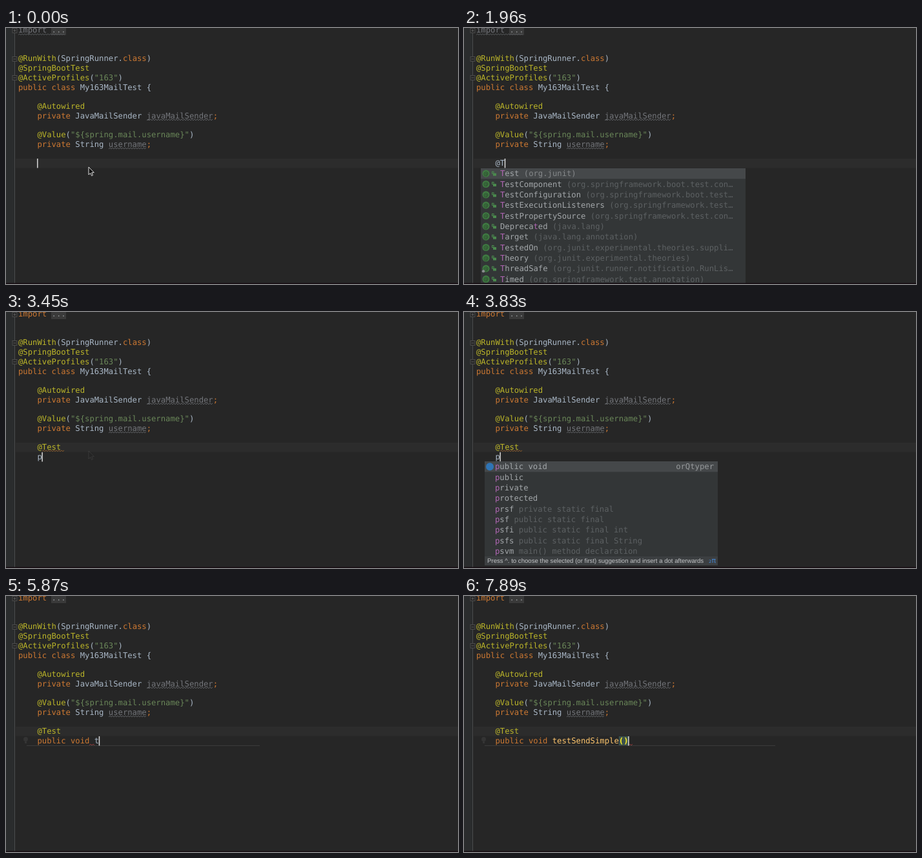
These frames come from a looping animation (700x396 px, 8000 ms). An HTML page with a canvas:

```html
<!DOCTYPE html>
<html lang="en">
<head>
<meta charset="utf-8">
<title>Code completion in an editor</title>
<style>
  html, body { margin: 0; width: 100%; height: 100%; overflow: hidden; background: #262626; }
  canvas { display: block; }
</style>
</head>
<body>
<canvas id="stage" width="700" height="396"></canvas>
<script>
const ctx = document.getElementById('stage').getContext('2d');
const LOOP = 8000, CHAR = 7.36, LINE = 14.72, ROW = 16.33, LEFT = 19;
const MONO = '12.23px "DejaVu Sans Mono", monospace';
const TEXT = '#a9b7c6', KEY = '#cc7832', NOTE = '#bbb529', STR = '#6a8759', DIM = '#73757a', RED = '#a03c3c';
const PLUGIN = 'orQtyper';
const HINT = 'Press ^. to choose the selected (or first) suggestion and insert a dot afterwards';

const colX = col => LEFT + col * CHAR;
const baseline = line => 51.4 + line * LINE;

function rect(x, y, w, h, color) {
  ctx.fillStyle = color;
  ctx.fillRect(x, y, w, h);
}

function put(text, x, y, color, font = MONO, align = 'left') {
  ctx.font = font;
  ctx.textAlign = align;
  ctx.fillStyle = color;
  ctx.fillText(text, x, y);
}

// parts: text, color, text, color, ...
function code(line, col, ...parts) {
  for (let i = 0; i < parts.length; i += 2) {
    put(parts[i], colX(col), baseline(line), parts[i + 1]);
    col += parts[i].length;
  }
}

function wave(x1, x2, y, color) {
  ctx.beginPath();
  for (let x = x1, up = 0; x <= x2; x += 2, up ^= 1) ctx.lineTo(x, y + (up ? -0.9 : 0.9));
  ctx.strokeStyle = color;
  ctx.lineWidth = 0.9;
  ctx.stroke();
}

function foldMark(y, plus) {
  rect(9.5, y - 4, 8, 8, '#262626');
  ctx.strokeStyle = '#555';
  ctx.lineWidth = 0.8;
  ctx.strokeRect(10, y - 3.5, 7, 7);
  rect(11.5, y - 0.4, 4, 0.8, '#666');
  if (plus) rect(13.1, y - 2, 0.8, 4, '#666');
}

function disc(x, y, r, color) {
  ctx.beginPath();
  ctx.arc(x, y, r, 0, 7);
  ctx.fillStyle = color;
  ctx.fill();
}

function pointer(alpha) {
  ctx.globalAlpha = alpha;
  ctx.beginPath();
  [[128, 215], [128, 227], [130.8, 224.5], [132.6, 228.6], [134.5, 227.7], [132.7, 223.8], [136.3, 223.6]]
    .forEach(p => ctx.lineTo(...p));
  ctx.closePath();
  ctx.fillStyle = '#111';
  ctx.fill();
  ctx.strokeStyle = '#ddd';
  ctx.lineWidth = 1;
  ctx.stroke();
  ctx.globalAlpha = 1;
}

function annotationIcon(x, y, runner) {
  disc(x, y, 5.6, '#3f7a42');
  put('@', x, y + 2.8, '#263a28', '8px "DejaVu Sans", sans-serif', 'center');
  if (runner) disc(x - 4, y + 4, 2.2, '#8a8d8f');
  rect(x + 11, y - 0.5, 5, 4, '#4b8a4e');
  ctx.strokeStyle = '#4b8a4e';
  ctx.lineWidth = 1;
  ctx.strokeRect(x + 9.5, y - 3, 2.5, 3);
}

// items: [name, tail]; a tail equal to PLUGIN is set at the right edge
function popup({ x, y, w, pad, items, prefix, hint, icons }) {
  const h = items.length * ROW;
  rect(x, y, w, h, '#333637');
  rect(x, y, w, ROW, '#45484a');
  items.forEach(([name, tail = ''], i) => {
    const mid = y + (i + 0.5) * ROW, base = mid + 4.1, textX = x + pad;
    const own = tail === PLUGIN;
    if (own) disc(x + 8, mid, 6, '#2f74b5');
    else if (icons) annotationIcon(x + 8, mid, name === 'ThreadSafe');
    put(name, textX, base, '#a3a7aa');
    const at = prefix ? name.toLowerCase().indexOf(prefix) : -1;
    if (at >= 0) {
      const hitX = textX + at * CHAR;
      rect(hitX, mid - 7, CHAR, 14, i ? '#333637' : '#45484a');
      put(name[at], hitX, base, '#b267b5');
    }
    if (own) put(tail, x + w - 6, base, '#96999b', MONO, 'right');
    else put(tail, textX + (name.length + 1) * CHAR, base, i ? '#5d6163' : '#85888a');
  });
  if (hint) {
    rect(x, y + h, w, 14, '#3c3f41');
    put(HINT, x + 4, y + h + 10.2, '#c4c6c8', '9.65px "Liberation Sans", Arial, sans-serif');
    put('₂π', x + w - 3, y + h + 10.2, '#4585cf', '11px "DejaVu Sans", sans-serif', 'right');
  }
}

const SPRING = '(org.springframework.';
const annotations = [
  ['Test', '(org.junit)'],
  ['TestComponent', SPRING + 'boot.test.con…'],
  ['TestConfiguration', SPRING + 'boot.test…'],
  ['TestExecutionListeners', SPRING + 'test…'],
  ['TestPropertySource', SPRING + 'test.con…'],
  ['Deprecated', '(java.lang)'],
  ['Target', '(java.lang.annotation)'],
  ['TestedOn', '(org.junit.experimental.theories.suppli…'],
  ['Theory', '(org.junit.experimental.theories)'],
  ['ThreadSafe', '(org.junit.runner.notification.RunLis…'],
  ['Timed', SPRING + 'test.annotation)']
];
const modifiers = [
  ['public'], ['private'], ['protected'],
  ['prsf', 'private static final'],
  ['psf', 'public static final'],
  ['psfi', 'public static final int'],
  ['psfs', 'public static final String'],
  ['psvm', 'main() method declaration']
];
const setters = [['setJavaMailSender'], ['setUsername']];

function popups(t) {
  const within = (a, b) => t >= a && t < b;
  if (within(840, 2660)) {
    const items = t < 2110 ? annotations
      : [['Test', PLUGIN], ...annotations.filter(a => a[0] !== 'Deprecated')];
    popup({ x: 26, y: 217, w: 410, pad: 30, items, prefix: t < 1730 ? '' : 't', icons: true });
  }
  if (within(3680, 4460)) {
    const items = t < 3830 ? modifiers : [['public void', PLUGIN], ...modifiers];
    popup({ x: 32, y: 231, w: 361, pad: 16, items, prefix: 'p', hint: true });
  }
  if (within(6340, 7360)) {
    const items = t < 6570 ? setters : [['testSendSimple()', PLUGIN], ...setters];
    popup({ x: 121, y: 231, w: 361, pad: 16, items, prefix: 't', hint: true });
  }
}

// Latest text whose start time has passed
const latest = (t, steps) => steps.reduce((now, [start, text]) => t >= start ? text : now, '');

const blinks = [[530, 610], [2580, 2660], [4290, 4460], [6810, 7360], [7750, 7890]];

function staticCode(t) {
  rect(0, 0, 13, 396, '#2a2c2d');
  rect(13, 0, 1, 396, '#4a4c4d');
  rect(15, 202, 685, 14.5, '#2c2c2c');
  rect(70, -3, 23, 14, '#3a3a3a');
  const resolved = t >= 3050;
  code(-3, 0, 'import ', resolved ? KEY : DIM, '...', '#8a8c8e');
  if (!resolved) wave(19, 92, 9.8, '#5c5e61');
  code(0, 0, '@RunWith', NOTE, '(SpringRunner.', TEXT, 'class', KEY, ')', TEXT);
  code(1, 0, '@SpringBootTest', NOTE);
  code(2, 0, '@ActiveProfiles', NOTE, '(', TEXT, '"163"', STR, ')', TEXT);
  code(3, 0, 'public class ', KEY, 'My163MailTest {', TEXT);
  code(5, 4, '@Autowired', NOTE);
  code(6, 4, 'private ', KEY, 'JavaMailSender ', TEXT, 'javaMailSender', DIM, ';', KEY);
  code(8, 4, '@Value', NOTE, '(', TEXT, '"${spring.mail.username}"', STR, ')', TEXT);
  code(9, 4, 'private ', KEY, 'String ', TEXT, 'username', DIM, ';', KEY);
  wave(218, 321, 142, '#66686b');
  wave(159, 218, 186.2, '#66686b');
  foldMark(4, true);
  foldMark(48);
  foldMark(77);
}

function typedCode(t) {
  const note = latest(t, [[610, '@'], [1730, '@T'], [2660, '@Test']]);
  const method = latest(t, [[3450, 'p'], [4460, 'public void'], [4870, 'public void '],
    [5080, 'public void t'], [7360, 'public void testSendSimple()']]);
  code(11, 4, note, t >= 3050 ? NOTE : TEXT);
  if (t >= 3130 && t < 4870) wave(t < 4460 ? 56 : 85, 91, 214.8, t < 4460 ? '#96602c' : RED);

  if (t >= 4460) rect(32, 231, (t < 6340 ? 393 : 482) - 32, 1, '#3b3b3b');
  if (t >= 5870) {
    disc(30.5, 221.5, 3.5, '#343434');
    rect(29, 225, 3, 3, '#343434');
  }
  if (t < 4460) code(12, 4, method, TEXT);
  else {
    const name = method.slice(12), done = t >= 7670;
    code(12, 4, 'public void ', KEY);
    if (done) {
      rect(colX(30), 217, 2 * CHAR, 14, '#3b514d');
      code(12, 16, name.slice(0, -2), '#ffc66d');
      put('()', colX(30), baseline(12), '#ffef28', 'bold ' + MONO);
      wave(255, 262, 230, RED);
    } else code(12, 16, name, TEXT);
    if (t >= 5330 && t < 7360) wave(129, 137, 230, RED);
  }

  if (!blinks.some(([a, b]) => t >= a && t < b)) {
    const second = t >= 3130;
    const x = colX(4 + (second ? method : note).length);
    rect(x - 0.4, second ? 217 : 202, 1.5, 14.5, '#d8d8d8');
  }
}

function draw(t) {
  ctx.textRendering = 'geometricPrecision';
  rect(0, 0, 700, 396, '#262626');
  staticCode(t);
  typedCode(t);
  if (t < 610) pointer(1);
  else if (t >= 2660 && t < 3680) pointer(0.1);
  popups(t);
  rect(0, 394.5, 700, 1.5, '#170d13');
}

const start = performance.now();
function frame() {
  draw((performance.now() - start) % LOOP);
  requestAnimationFrame(frame);
}
frame();
</script>
</body>
</html>
```
